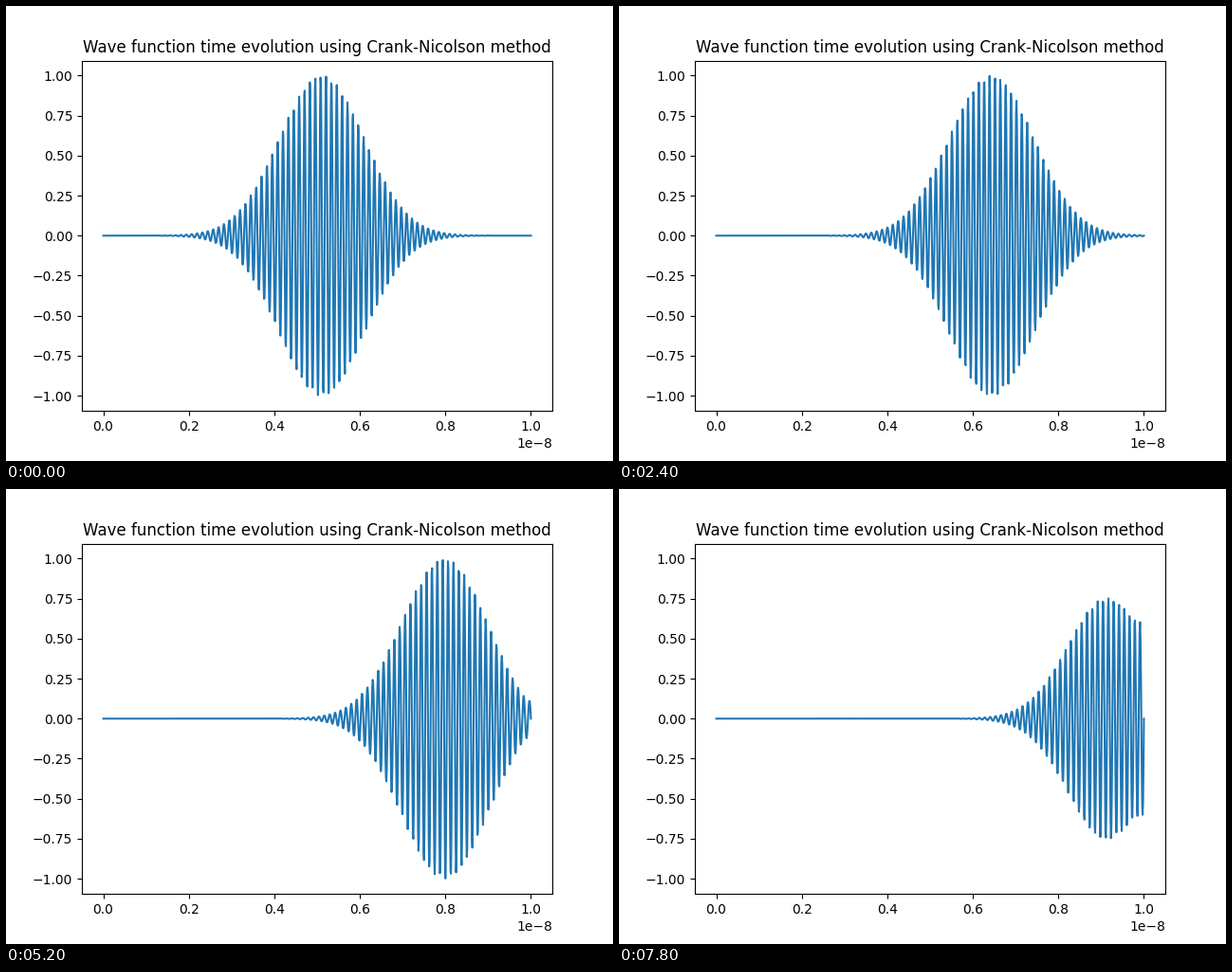
A matplotlib script for the animation above (8000 ms loop, 640 px wide and 480 px high).

```python
import numpy as np
import matplotlib.pyplot as plt
from matplotlib.animation import FuncAnimation

HBAR = 1.0546e-34
MASS = 9.109e-31
L = 1e-8
N = 1000
A = L / N
DT = 1e-18
SIGMA = 1e-9
KAPPA = 5e10
STEPS = 20      # time steps per drawn frame
FRAMES = 40
INTERVAL = 200

x = np.linspace(0, L, N + 1)
psi0 = np.exp(-(x - L / 2) ** 2 / (2 * SIGMA ** 2)) * np.exp(1j * KAPPA * x)
psi0[[0, N]] = 0

# Crank-Nicolson between hard walls is diagonal in the sine modes of the box.
k = np.arange(1, N)
modes = np.sin(np.pi * np.outer(k, k) / N)
coeffs = 2 / N * (modes @ psi0[1:N])
theta = HBAR * DT / (2 * MASS * A ** 2) * (1 - np.cos(np.pi * k / N))
angle = -2 * np.arctan(theta)   # phase gained by each mode per time step


def wave(step):
    psi = np.zeros(N + 1)
    psi[1:N] = modes @ (coeffs * np.exp(1j * angle * step)).real
    return psi


fig, ax = plt.subplots(figsize=(6.4, 4.8), dpi=100)
line, = ax.plot(x, psi0.real)
ax.set_title("Wave function time evolution using Crank-Nicolson method")
ax.autoscale_view()
ax.set_xlim(ax.get_xlim())
ax.set_ylim(ax.get_ylim())


def update(i):
    line.set_ydata(wave(STEPS * (i + 1)))
    return line,


anim = FuncAnimation(fig, update, frames=FRAMES, interval=INTERVAL,
                     repeat=True, repeat_delay=0)
plt.show()
```
